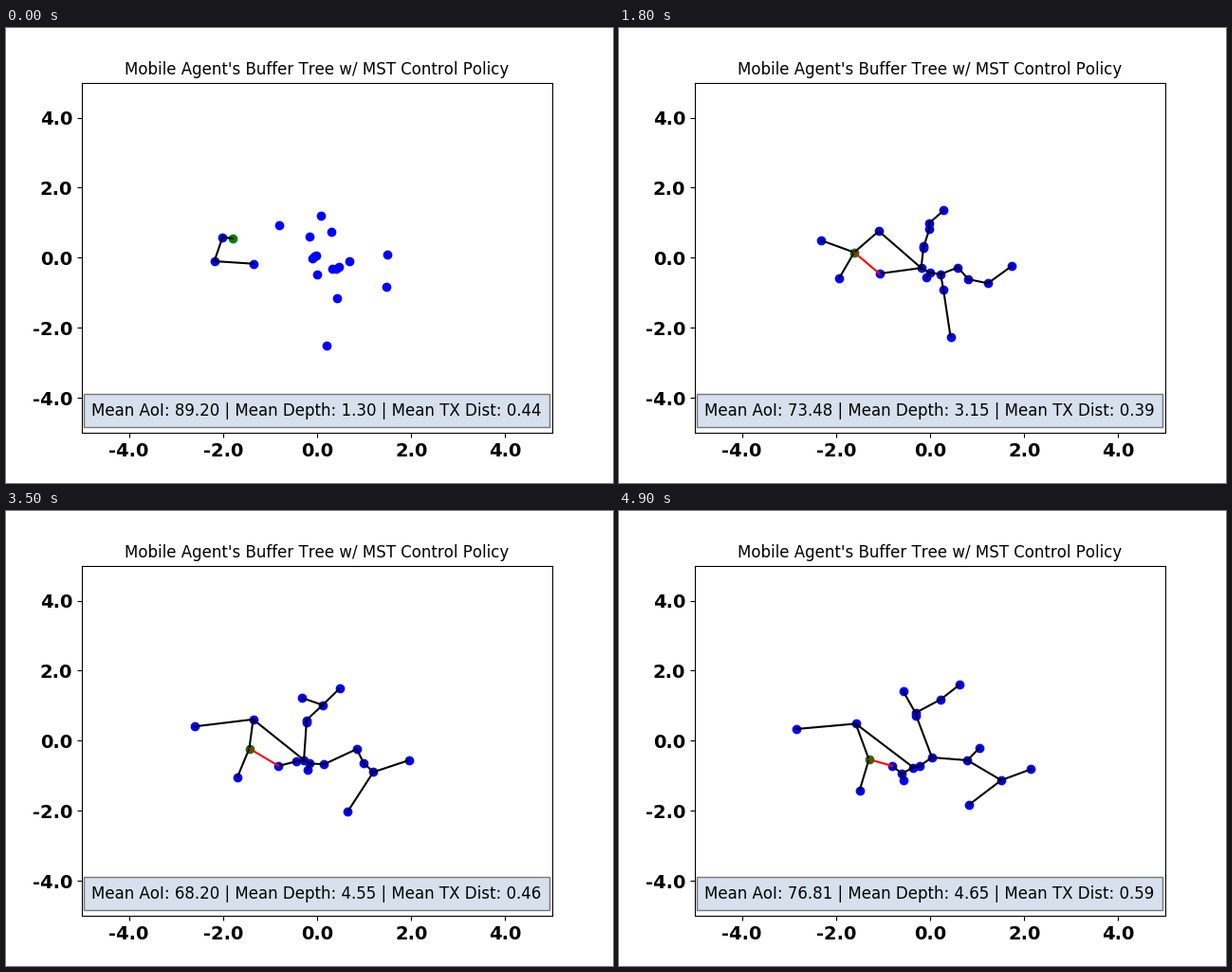
A matplotlib script that plays this animation: 640 by 480 pixels, repeating every 5000 ms.

```python
import numpy as np
import matplotlib.pyplot as plt
from matplotlib.animation import FuncAnimation

plt.rcParams["text.kerning_factor"] = 6

FRAMES, INTERVAL = 50, 100
SYNC_FRAME = 18                   # the whole swarm is known from here on
ROOT, RELAY, HUB = 0, 4, 10
UNIT = np.array([49.6, -36.96])   # pixels per data unit
CENTER = np.array([328, 242.4])

# Every agent drifts in a straight line: (x, y) at the start, (x, y) at the end.
PATHS = np.array([
    (239, 222, 263.5, 262), (228.4, 220.6, 187, 230), (219.6, 246, 253.6, 295),
    (261, 248.7, 298, 277), (288, 208.4, 249.6, 224.4), (332.4, 198, 359.4, 183),
    (343, 215, 299.6, 190), (320.3, 219.7, 339.3, 198.7), (326.6, 240, 312.6, 213),
    (325.4, 241, 313.4, 216), (323.4, 243, 310.4, 270.6), (328.4, 260, 317, 269),
    (344.4, 254, 380, 250), (348, 254, 403, 284), (350.6, 252, 288.4, 269),
    (361.6, 245.8, 300.4, 283.6), (402, 239, 434.4, 272.4), (401.4, 273, 367.4, 263),
    (349, 285, 330, 260), (338, 335, 369.4, 309.6),
])
START, END = np.split((PATHS.reshape(-1, 4) - np.tile(CENTER, 2))
                      / np.tile(UNIT, 2), 2, axis=1)

# Readings of the status line: frame, age, depth, distance.
READINGS = np.array([
    (0, 89.20, 1.30, .44), (14, 78.50, 1.30, .34), (22, 68.46, 5.00, .44),
    (28, 67.58, 5.30, .41), (35, 68.20, 4.55, .46), (44, 74.00, 4.60, .41),
    (49, 76.81, 4.65, .59),
]).T


def spanning_tree(points):
    """Return the parent of each agent in the minimum spanning tree."""
    distance = np.linalg.norm(points[:, None] - points, axis=2)
    parents = {ROOT: None}
    while len(parents) < len(points):
        parent, child = min(
            ((a, b) for a in parents for b in range(len(points))
             if b not in parents), key=lambda edge: distance[edge])
        parents[child] = parent
    return parents


def links(frame, points):
    """Return the tree's edges and the edge that is transmitting."""
    if frame < SYNC_FRAME:
        return [(0, 1), (1, 2), (2, 3)], None
    parents = spanning_tree(points)
    sender = HUB
    while parents[sender] != ROOT:
        sender = parents[sender]
    edges = {(p, c) for c, p in parents.items() if c != ROOT}
    # The hub still hangs on its old relay while the new link is being made.
    edges = edges - {(ROOT, sender)} | {(RELAY, HUB)}
    return sorted(edges), (ROOT, sender)


def segments(points, edges):
    """Join separate edges into one line broken by gaps."""
    gap = [[np.nan, np.nan]]
    return np.vstack([np.vstack([points[list(e)], gap]) for e in edges]).T


fig, ax = plt.subplots(figsize=(6.4, 4.8), dpi=100)
ax.set(xlim=(-5, 5), ylim=(-5, 5))
ax.set_title("Mobile Agent's Buffer Tree w/ MST Control Policy", fontsize=12)
ticks = np.arange(-4, 5, 2)
labels = [f"{t:.1f}" for t in ticks]
ax.set_xticks(ticks, labels, fontsize=14, fontweight="bold")
ax.set_yticks(ticks, labels, fontsize=14, fontweight="bold")

agents, = ax.plot([], [], "bo")
root, = ax.plot([], [], "go")
tree, = ax.plot([], [], "k-", lw=1.5)
transmission, = ax.plot([], [], "r-", lw=1.5)
status = ax.text(.02, .05, "", transform=ax.transAxes, fontsize=12,
                 bbox=dict(boxstyle="square,pad=0.5",
                           facecolor="lightsteelblue", alpha=.5))


def update(frame):
    points = START + (END - START) * frame / (FRAMES - 1)
    edges, active = links(frame, points)
    agents.set_data(*points[1:].T)
    root.set_data(*points[:1].T)
    tree.set_data(*segments(points, edges))
    transmission.set_data(*(points[list(active)].T if active else ([], [])))
    age, depth, distance = (np.interp(frame, READINGS[0], row)
                            for row in READINGS[1:])
    depth = round(depth * len(points)) / len(points)
    status.set_text(f"Mean AoI: {age:.2f} | Mean Depth: {depth:.2f} | "
                    f"Mean TX Dist: {distance:.2f}")
    return agents, root, tree, transmission, status


animation = FuncAnimation(fig, update, frames=FRAMES, interval=INTERVAL,
                          repeat=True, repeat_delay=0)
plt.show()
```
